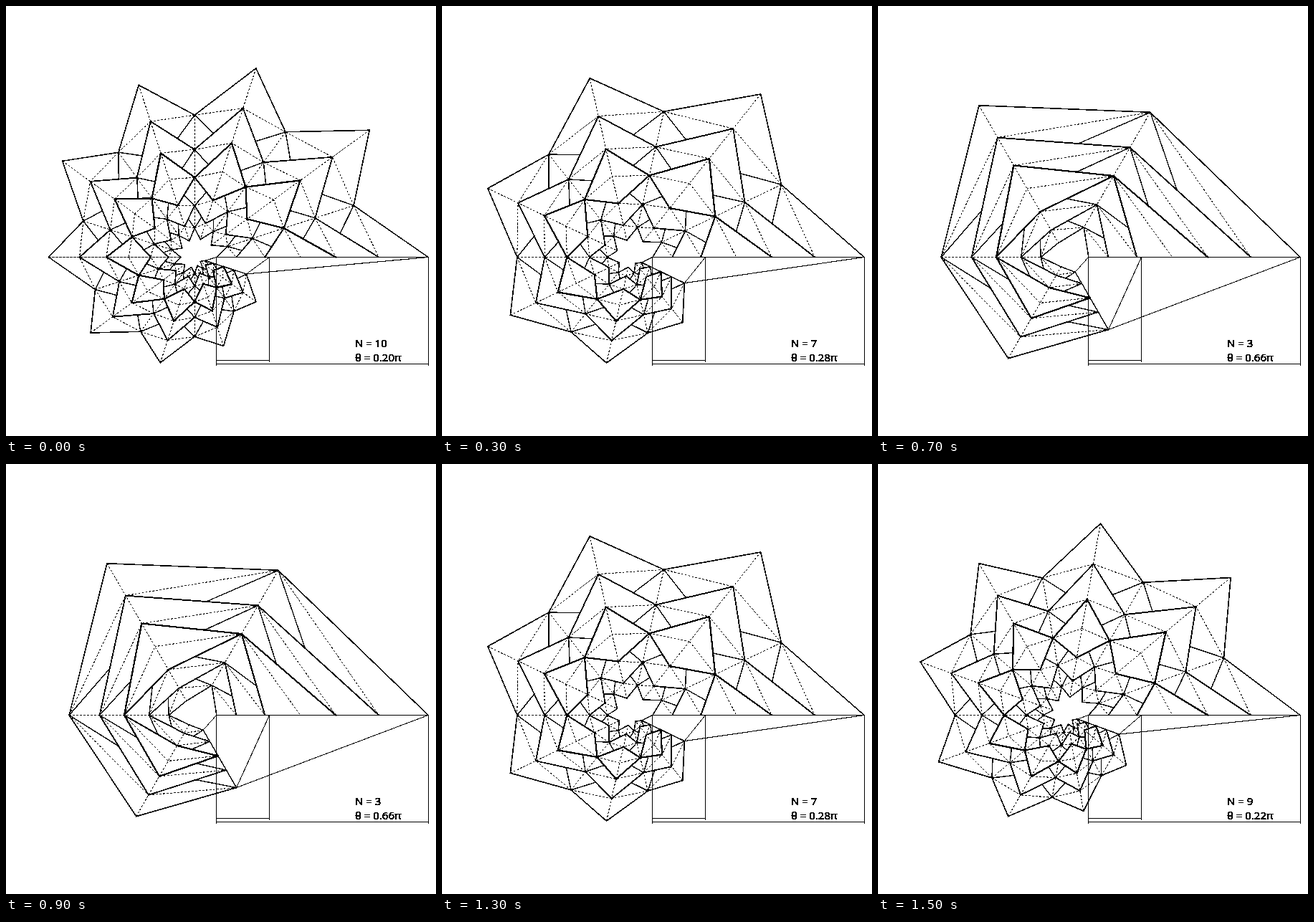
An HTML page with a canvas for the animation above (1.6 s loop, 600 by 600 pixels).

```html
<!DOCTYPE html>
<html lang="en">
<head>
<meta charset="utf-8">
<title>Folded spiral</title>
<style>
  html, body { margin: 0; overflow: hidden; background: #fff; }
  canvas { display: block; }
</style>
</head>
<body>
<canvas width="600" height="600"></canvas>
<script>
const ctx = document.querySelector('canvas').getContext('2d', { willReadFrequently: true });
const CX = 263.2, CY = 350.5, STEP = 100;

// Radii along the first tip ray and the first valley ray, outside to inside
const TIPS = [326, 257, 197, 147.5, 98, 58.2, 30.7];
const VALLEYS = [233.4, 176.8, 131, 84.7, 48];

// Solid zigzags: [tip, valley, line width]
const EDGES = [[0, 0, 1.5], [1, 1, 1.7], [2, 2, 2.1], [4, 2, 2], [5, 3, 1.6], [6, 4, 1.4]];
// Dashed zigzags: [tip, valley]
const FOLDS = [[1, 0], [2, 1], [3, 2], [4, 3], [5, 4]];
// Pleats: from a valley to a fraction of the edge between another valley and a tip
const PLEATS = [[0, 1, 1, .39], [1, 2, 2, .37], [3, 2, 4, .64], [4, 3, 5, .64]];

const mix = (a, b, f) => a.map((v, i) => v + (b[i] - v) * f);

function line(a, b, width = 1, dash = []) {
  ctx.lineWidth = width;
  ctx.lineCap = dash.length ? 'butt' : 'round';
  ctx.setLineDash(dash);
  ctx.beginPath();
  ctx.moveTo(...a);
  ctx.lineTo(...b);
  ctx.stroke();
}
const dashed = (a, b) => line(a, b, 1, [3, 2]);

function spiral(n) {
  const place = (radius, k, angle) => {
    const r = radius * (1 - .75 * k / n);
    return [CX + r * Math.cos(angle), CY - r * Math.sin(angle)];
  };
  const tip = (i, k) => place(TIPS[i], k, 2 * Math.PI * k / n);
  const valley = (i, k) => place(VALLEYS[i], k, Math.PI * (2 * k + 1) / n);

  for (let k = 0; k < n; k++) {
    const last = k === n - 1;
    if (k) dashed(tip(0, k), tip(6, k));
    if (last) line(valley(0, k), valley(4, k), 1.3);
    else dashed(valley(0, k), valley(4, k));

    for (const next of last ? [k] : [k, k + 1]) {
      for (const [t, v, width] of EDGES) line(tip(t, next), valley(v, k), width);
      for (const [t, v] of FOLDS) dashed(valley(v, k), tip(t, next));
      for (const [from, v, t, f] of PLEATS)
        line(valley(from, k), mix(valley(v, k), tip(t, next), f), 1.3);
    }
  }

  const end = valley(0, n - 1);
  line(end, [589, CY]);
  line(end, [367.5, CY]);
  line(valley(4, n - 1), [293.5, CY]);
}

function ruler() {
  line([293.5, CY], [589, CY]);
  line([293.5, CY], [293.5, 501.5]);
  line([589.5, CY], [589.5, 501.5]);
  line([293.5, 499.5], [589.5, 499.5]);
  line([367.5, CY], [367.5, 496.5]);
  line([293.5, 494.5], [367.5, 494.5]);
}

function label(text, y) {
  ctx.lineWidth = .6;
  ctx.setLineDash([]);
  ctx.fillText(text, 487, y);
  ctx.strokeText(text, 487, y);
}

// Turn soft edges into plain black pixels
function harden() {
  const image = ctx.getImageData(0, 0, 600, 600), px = image.data;
  for (let i = 3; i < px.length; i += 4) px[i] = px[i] > 110 ? 255 : 0;
  ctx.putImageData(image, 0, 0);
}

let shown;
function draw() {
  const step = Math.floor(performance.now() / STEP) % 16;
  if (step !== shown) {
    const n = 2 + Math.abs(8 - step);
    ctx.clearRect(0, 0, 600, 600);
    ctx.font = '15px "Open Sans", "Noto Sans", sans-serif';
    spiral(n);
    ruler();
    label(`N = ${n}`, 475.5);
    label(`θ = ${(Math.floor(200 / n) / 100).toFixed(2)}π`, 495.5);
    harden();
    shown = step;
  }
  requestAnimationFrame(draw);
}
draw();
</script>
</body>
</html>
```
